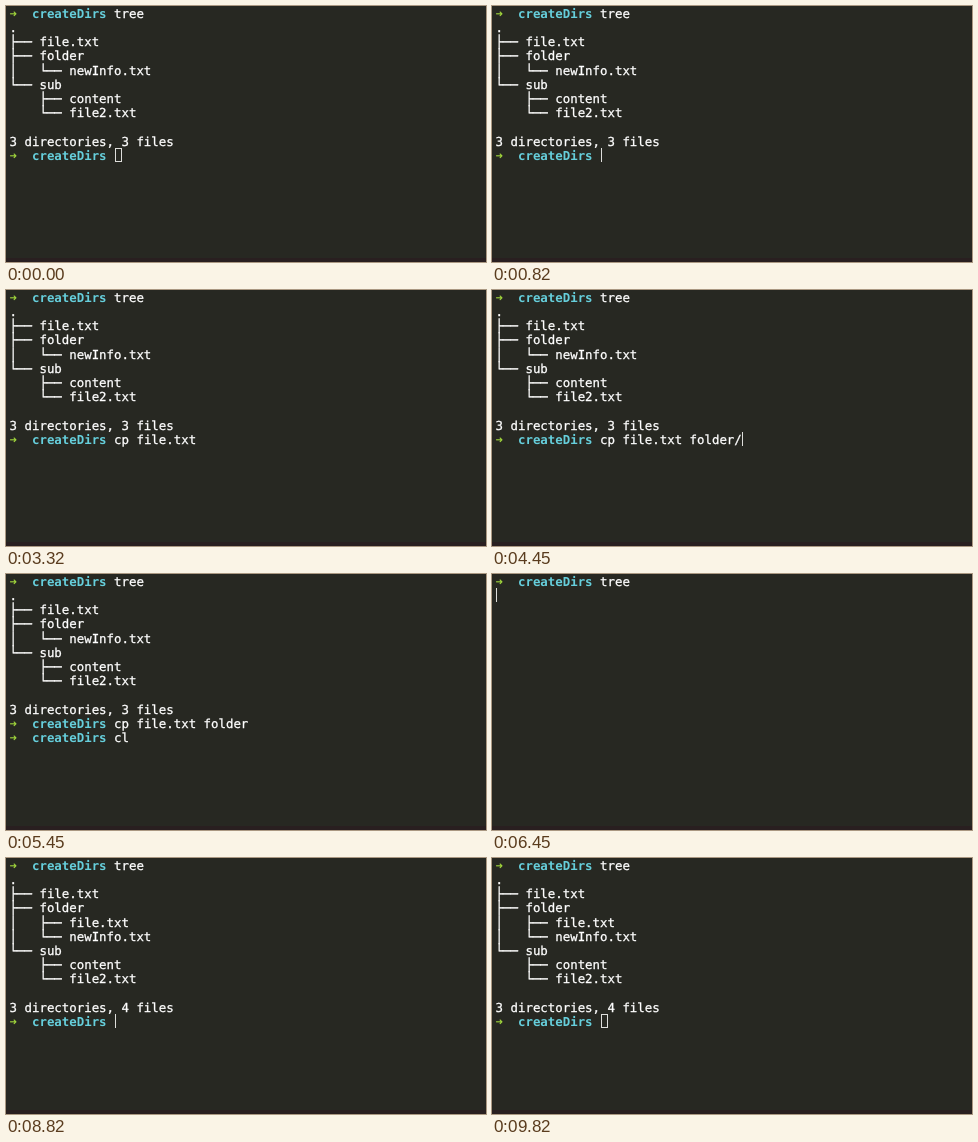
Animation, 480 px wide and 256 px high, one loop 9870 ms. Source, as an HTML page:

```html
<!DOCTYPE html>
<html lang="en">
<head>
<meta charset="utf-8">
<title>Terminal: copying a file into a folder</title>
<style>
  html, body { margin: 0; width: 100%; height: 100%; overflow: hidden; background: #272822; }
  body { position: relative; font: 12.4px/14.2px "DejaVu Sans Mono", monospace; color: #fff; text-rendering: geometricPrecision; }
  pre { position: absolute; left: 3.6px; top: .7px; margin: 0; font: inherit; -webkit-text-stroke: .3px; }
  b { color: #66cfdc; -webkit-text-stroke: 0; }
  b.arrow { display: inline-block; width: 1ch; color: #a0d53c; }
  #cursor { position: absolute; box-sizing: border-box; height: 14.2px; border: 0 solid #dededb; }
  #edge { position: absolute; left: 0; right: 0; top: 252px; height: 4px; background: #291f20; }
</style>
</head>
<body>
<pre id="screen"></pre>
<div id="cursor"></div>
<div id="edge"></div>
<script>
const LOOP = 9870, LINE = 14.2, BLINK = 500;
const FOCUS_IN = 600, FOCUS_OUT = 9500;
const PROMPT = '➜  createDirs ';

const listing = (inFolder, count) => [
  PROMPT + 'tree', '.',
  '├── file.txt',
  '├── folder', ...inFolder,
  '└── sub',
  '    ├── content',
  '    └── file2.txt', '',
  `3 directories, ${count} files`, PROMPT
].join('\n');

const before = listing(['│   └── newInfo.txt'], 3);
const after = listing(['│   ├── file.txt', '│   └── newInfo.txt'], 4);
const copied = before + 'cp file.txt folder\n' + PROMPT;

// [start time, screen text, cursor hidden while a command runs]
const steps = [
  [0, before],
  [1350, before + 'c'],
  [1480, before + 'cp'],
  [1610, before + 'cp '],
  [1800, before + 'cp f'],
  [1940, before + 'cp fi'],
  [2400, before + 'cp file.txt '],
  [3450, before + 'cp file.txt f'],
  [3600, before + 'cp file.txt fo'],
  [3750, before + 'cp file.txt fol'],
  [3900, before + 'cp file.txt fold'],
  [4150, before + 'cp file.txt folder/'],
  [4650, copied],
  [5150, copied + 'c'],
  [5290, copied + 'cl'],
  [5420, copied + 'cl', true],
  [5500, PROMPT],
  [5950, PROMPT + 't'],
  [6080, PROMPT + 'tr'],
  [6190, PROMPT + 'tre'],
  [6300, PROMPT + 'tree'],
  [6420, PROMPT + 'tree\n'],
  [6500, after]
];

const screen = document.getElementById('screen');
const cursor = document.getElementById('cursor');
let shown;

function draw(now) {
  const t = now % LOOP;
  const [start, text, busy] = steps.findLast(step => step[0] <= t);
  if (text !== shown) {
    shown = text;
    screen.innerHTML = text.replace(/➜  createDirs/g, '<b class="arrow">➜</b>  <b>createDirs</b>');
  }

  const lines = text.split('\n');
  const focused = t >= FOCUS_IN && t < FOCUS_OUT;
  const sinceKey = t - Math.max(start, FOCUS_IN);
  const visible = !busy && (!focused || sinceKey % (2 * BLINK) < BLINK);
  cursor.style.left = `calc(4.2px + ${lines.at(-1).length}ch)`;
  cursor.style.top = (lines.length - 1) * LINE + 'px';
  cursor.style.width = focused ? '1px' : '1ch';
  cursor.style.borderWidth = focused ? '0 0 0 1px' : '1px';
  cursor.style.visibility = visible ? 'visible' : 'hidden';
}

const origin = performance.now();
function tick() {
  draw(performance.now() - origin);
  requestAnimationFrame(tick);
}
tick();
</script>
</body>
</html>
```
